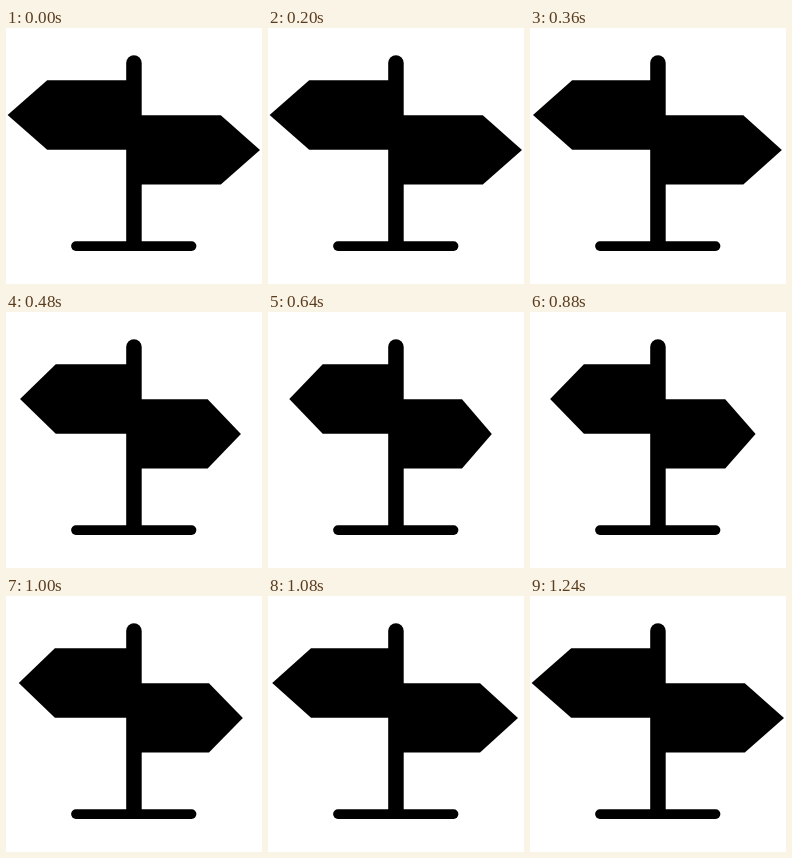
An HTML page for the animation above (1.4 s loop, 256 px wide and 256 px high).

```html
<!DOCTYPE html>
<html lang="en">
<head>
<meta charset="utf-8">
<title>Signpost</title>
<style>
  html, body { margin: 0; height: 100%; overflow: hidden; background: #fff; }
  svg { display: block; width: 100vw; height: 100vh; }
</style>
</head>
<body>
<svg viewBox="0 0 256 256">
  <path id="left" d="M128 52.3H41.2L1.6 87L41.2 121.7H128Z"/>
  <path id="right" d="M128 87.3H214.8L254 122L214.8 156.6H128Z"/>
  <path d="M120.2 218V35a7.75 7.75 0 0 1 15.5 0V218Z"/>
  <rect x="65.1" y="213.3" width="125.3" height="9.6" rx="4.8"/>
</svg>
<script>
const LOOP = 1400, MOVE = 520, POST_X = 128;
const left = document.getElementById('left');
const right = document.getElementById('right');

// Ease with control points (x1, 0) and (x2, 1), solved by bisection.
function ease(u, x1, x2) {
  u = Math.min(1, Math.max(0, u));
  let lo = 0, hi = 1;
  for (let i = 0; i < 24; i++) {
    const s = (lo + hi) / 2, r = 1 - s;
    if (3 * s * r * r * x1 + 3 * s * s * r * x2 + s ** 3 < u) lo = s;
    else hi = s;
  }
  return lo * lo * (3 - 2 * lo);
}

function narrow(sign, scale) {
  sign.setAttribute('transform',
    `translate(${POST_X * (1 - scale)} 0) scale(${scale} 1)`);
}

function draw(now) {
  const t = now % LOOP;
  const turn = ease((t - 200) / MOVE, 0.86, 0.19) - ease((t - 720) / MOVE, 0.82, 0.33);
  narrow(left, 1 - 0.158 * turn);
  narrow(right, 1 - 0.243 * turn);
}

const start = performance.now();
function tick() {
  draw(performance.now() - start);
  requestAnimationFrame(tick);
}
tick();
</script>
</body>
</html>
```
